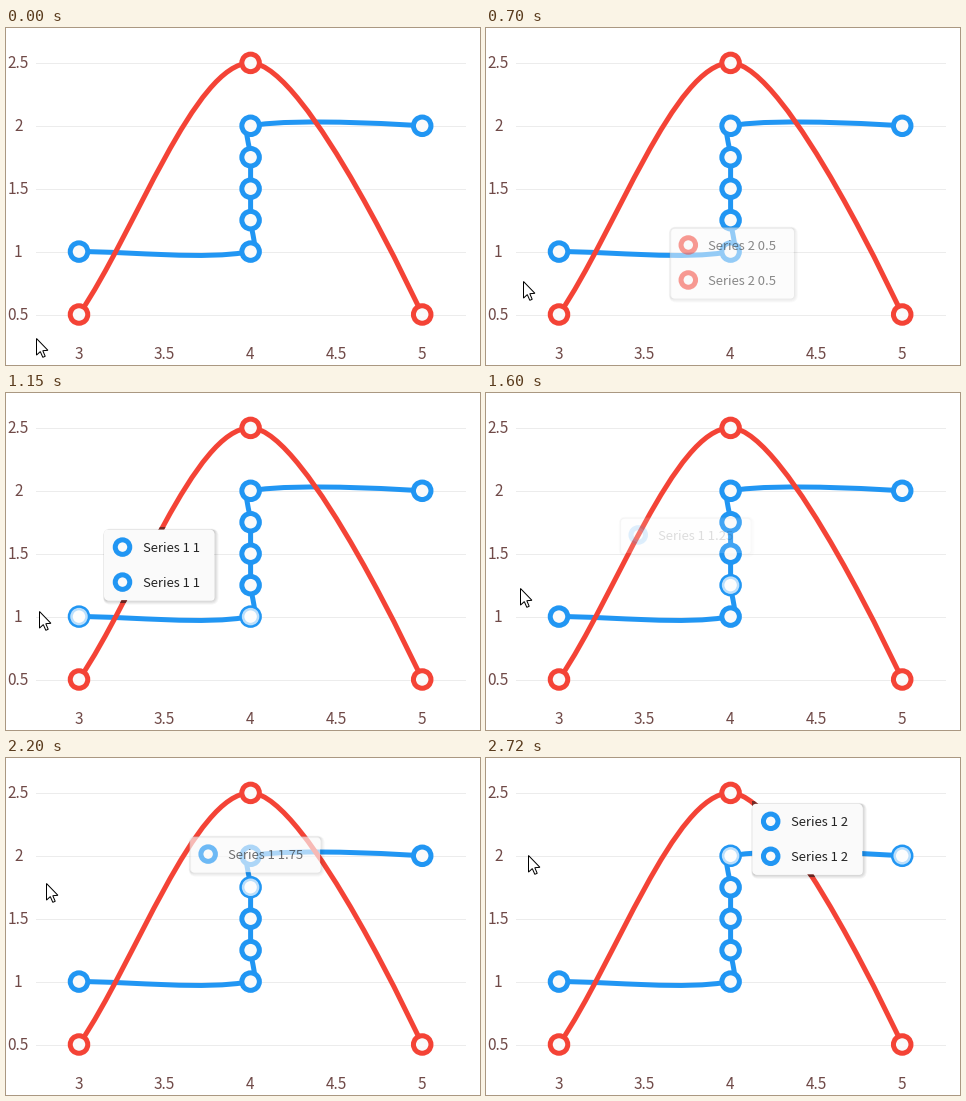
A matplotlib script for the animation above (3.02 s loop, 474 px wide and 337 px high).

```python
import numpy as np
import matplotlib.pyplot as plt
from matplotlib.animation import FuncAnimation
from matplotlib.patches import Circle, FancyBboxPatch, PathPatch, Polygon
from matplotlib.path import Path
from matplotlib.transforms import Bbox

W, H, DPI = 474, 337, 64
PX = 72 / DPI  # points per pixel
LOOP, STEP = 3020, 10
BLUE, RED, PALE, INK, LABEL = "#2196f3", "#f44336", "#fafafa", "#232323", "#704a48"
FONT = "Noto Sans CJK JP"

STEPS = [(3, 1), *[(4, v) for v in np.arange(1, 2.1, .25)], (5, 2)]
PEAK = [(3, .5), (4, 2.5), (5, .5)]
SERIES = [(STEPS, BLUE), (PEAK, RED)]

# Moments at which the picture is refreshed, with pauses between the runs
TICKS = np.concatenate([np.arange(a, b + 1, 50) for a, b in (
    (0, 400), (700, 1150), (1450, 2200), (2260, 2460), (2520, 2720))])

# Pointer tip: time, x, y
POINTER = np.array([(0, 30, 310), (400, 36, 259), (620, 37.5, 259),
                    (1150, 33, 218), (1420, 33, 218), (1950, 37, 150),
                    (2200, 40, 125), (2720, 42, 97)])
ARROW = np.array([(0, 0), (0, 16.6), (3.8, 13.1), (6.3, 18.8), (8.7, 17.8),
                  (6.3, 12.2), (11.4, 11.8)])

# Tooltip visits: series, value, opens, starts to close
VISITS = [(1, .5, 150, 630), (0, 1, 950, 1430), (0, 1.25, 1570, 1740),
          (0, 1.5, 1880, 1960), (0, 1.75, 2070, 2360), (0, 2, 2520, LOOP)]
FADE_IN, FADE_OUT, ROW = 200, 150, 35


def to_px(point):
    x, y = point
    return np.array([73 + (x - 3) * 171.6, 349.4 - 125.8 * y])


def spline(points, smooth=.65):
    """Smooth Bezier path through the data points."""
    p = [to_px(q) for q in points]
    p = [p[0], *p, p[-1]]
    mids = [(a + b) / 2 for a, b in zip(p, p[1:])]
    lens = [np.hypot(*(b - a)) for a, b in zip(p, p[1:])]
    slopes = []
    for i in range(1, len(p) - 1):
        k = lens[i - 1] / (lens[i - 1] + lens[i])
        slopes.append(mids[i - 1] + (mids[i] - mids[i - 1]) * k)
    verts, last = [p[1]], len(p) - 3
    for i in range(1, last + 1):
        lead = (mids[i] - slopes[i - 1]) * smooth
        trail = (mids[i] - slopes[i]) * smooth * (i < last)
        verts += [p[i] + lead, p[i + 1] + trail, p[i + 1]]
    return Path(verts, [Path.MOVETO] + [Path.CURVE4] * (len(verts) - 1))


def plan_tips():
    """Contents and place of each tooltip, laid out with the size of the one before."""
    tips = []
    for n, value, start, stop in VISITS:
        points, color = SERIES[n]
        hits = [to_px(q) for q in points if q[1] == value]
        label = f"Series {n + 1} {value:g}"
        size = np.array([42 + 6.8 * len(label), ROW * len(hits) + .5])
        x, y = np.mean(hits, axis=0)
        before = tips[-1]["size"] if tips else size
        place = np.array([x + 1 - before[0] / 2, y - 16.5 - before[1]])
        tips.append(dict(start=start, stop=stop, label=label, color=color,
                         rows=len(hits), size=size, place=place,
                         origin=tips[-1]["place"] if tips else place))
    return tips


def add_curve(points, color, z):
    return ax.add_patch(PathPatch(spline(points), fc="none", ec=color,
                                  lw=5 * PX, capstyle="butt", zorder=z))


def add_ring(center, radius, color, z):
    return ax.add_patch(Circle(center, radius, fc=PALE, ec=color,
                               lw=5 * PX, zorder=z))


def add_text(x, y, text, size, color, **kw):
    return ax.text(x, y, text, family=FONT, fontsize=size * PX, color=color,
                   va="baseline", **kw)


def add_box(radius, z, **kw):
    style = f"round,pad=0,rounding_size={radius}"
    return ax.add_patch(FancyBboxPatch((0, 0), 20, 20, boxstyle=style,
                                       zorder=z, **kw))


fig = plt.figure(figsize=(W / DPI, H / DPI), dpi=DPI, facecolor="white")
ax = fig.add_axes([0, 0, 1, 1])
ax.set_xlim(0, W)
ax.set_ylim(H, 0)
ax.axis("off")

# Grid and labels
for v in np.arange(.5, 2.6, .5):
    y = to_px((0, v))[1]
    ax.plot([30, 459], [y, y], color="#ececec", lw=PX, zorder=0)
    add_text(12.3, y + 5.5, f"{v:g}", 15.4, LABEL, ha="center")
for v in np.arange(3, 5.1, .5):
    add_text(to_px((v, 0))[0] - .3, 331, f"{v:g}", 15.4, LABEL, ha="center")

# Series, each point with a pale disc for its hovered state
hovers = []
for n, (points, color) in enumerate(SERIES):
    add_curve(points, color, 2 * n + 1)
    for q in points:
        center = to_px(q)
        add_ring(center, 8.75, color, 2 * n + 2)
        hovers.append(ax.add_patch(Circle(center, 8.75, fc="white", ec="none",
                                          alpha=.7, zorder=6)))

# Tooltip; the shadow is made of outlines so that it never tints the panel
TIPS = plan_tips()
shade_line = add_curve(PEAK, "#6b2a26", 7)
shadows = [add_box(4 + g, 8, fc="none", ec="black", lw=PX) for g in range(4)]
panel = add_box(4, 9, fc=PALE, ec="none")
rings = [add_ring((0, 0), 7.25, BLUE, 10) for _ in range(2)]
texts = [add_text(0, 0, "", 13, INK, zorder=11) for _ in range(2)]

pointer = ax.add_patch(Polygon(ARROW, closed=True, fc="white", ec="black",
                               lw=PX, joinstyle="miter", zorder=20))


def show(artist, alpha):
    artist.set_alpha(alpha)
    artist.set_visible(alpha > 0)


def draw_tip(t):
    tip = [tip for tip in TIPS if tip["start"] <= t or tip is TIPS[0]][-1]
    age = (t - tip["start"]) / FADE_IN
    alpha = np.clip(min(age, 1 + (tip["stop"] - t) / FADE_OUT), 0, 1)
    ease = 1 - (1 - np.clip(age, 0, 1)) ** 3
    left, top = tip["origin"] + (tip["place"] - tip["origin"]) * ease
    width, height = tip["size"]

    for g, shadow in enumerate(shadows):
        shadow.set_bounds(left + 1 - g / 2, top + 1 - g / 2,
                          width + 1.5 * g, height + 1.5 * g)
        show(shadow, .16 * alpha * (1 - g / 4))
    panel.set_bounds(left, top, width, height)
    show(panel, alpha)
    shade_line.set_clip_box(Bbox.from_extents(
        left, H - top - height - 3, left + width + 2, H - top + 3))
    show(shade_line, max(0, alpha * 3 - 2) * .9)

    for row, (ring, text) in enumerate(zip(rings, texts)):
        y = top + ROW * (row + .5)
        ring.center = left + 18.5, y
        ring.set_edgecolor(tip["color"])
        text.set_position((left + 38.7, y + 4.7))
        text.set_text(tip["label"])
        for part in (ring, text):
            show(part, alpha * (row < tip["rows"]))


def update(frame):
    t = TICKS[np.searchsorted(TICKS, frame * STEP, side="right") - 1]
    x, y = (np.interp(t, POINTER[:, 0], POINTER[:, i]) for i in (1, 2))
    pointer.set_xy(ARROW + np.round((x, y)) + .5)
    for disc in hovers:
        disc.set_visible(-8 < disc.center[1] - y < 12)
    draw_tip(t)
    return []


anim = FuncAnimation(fig, update, frames=LOOP // STEP, interval=STEP,
                     init_func=lambda: update(0), repeat=True, repeat_delay=0)
plt.show()
```
